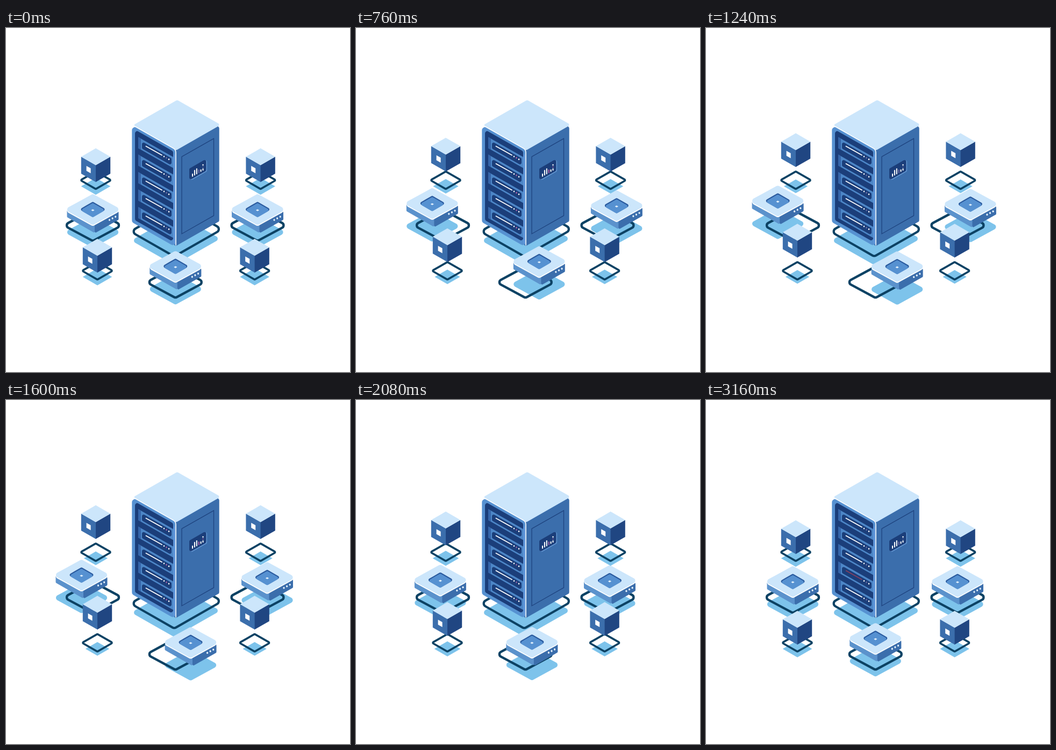
An HTML page with a canvas for the animation above (3600 ms loop, 640 by 640 pixels).

```html
<!DOCTYPE html>
<html lang="en">
<head>
<meta charset="utf-8">
<title>Server network</title>
<style>
  html, body { margin: 0; width: 100%; height: 100%; overflow: hidden; background: #fff; }
  canvas { display: block; width: 640px; height: 640px; }
</style>
</head>
<body>
<canvas id="stage"></canvas>
<script>
const LOOP = 3600, STEP = 20, LAST = 3160;
const SLOPE = 0.57;
const C = {
  pale: '#cce6fb', frame: '#5691d1', light: '#5b92cc', mid: '#3b6eac', deep: '#204682',
  navy: '#1b3e7a', ring: '#0c4264', shadow: '#7dc3eb', white: '#fff', spark: '#e4f2fd'
};
const canvas = document.getElementById('stage');
const g = canvas.getContext('2d');
const dpr = window.devicePixelRatio || 1;
canvas.width = canvas.height = 640 * dpr;

// Closed polygon with rounded corners
function trace(pts, r) {
  const n = pts.length, a = pts[n - 1], b = pts[0];
  g.beginPath();
  g.moveTo((a[0] + b[0]) / 2, (a[1] + b[1]) / 2);
  pts.forEach((p, i) => g.arcTo(...p, ...pts[(i + 1) % n], r));
  g.closePath();
}
function fill(pts, color, r = 0) {
  trace(pts, r);
  g.fillStyle = color;
  g.fill();
}
function outline(pts, color, width, r = 0) {
  trace(pts, r);
  g.strokeStyle = color;
  g.lineWidth = width;
  g.stroke();
}
function line(x1, y1, x2, y2, color, width) {
  g.beginPath();
  g.moveTo(x1, y1);
  g.lineTo(x2, y2);
  g.strokeStyle = color;
  g.lineWidth = width;
  g.lineCap = 'round';
  g.stroke();
}
function dot(x, y, rx, ry, color) {
  g.beginPath();
  g.ellipse(x, y, rx, ry, 0, 0, 7);
  g.fillStyle = color;
  g.fill();
}

// Isometric shapes: centred diamond, floor rectangle from its front corner, upright wall
const diamond = (x, y, w, h = w * 0.575) => [[x, y - h], [x + w, y], [x, y + h], [x - w, y]];
const plate = (x, y, left, right) => [
  [x, y], [x + right, y - right * SLOPE],
  [x + right - left, y - (left + right) * SLOPE], [x - left, y - left * SLOPE]
];
const wall = (x, y, w, h, slope = SLOPE) =>
  [[x, y], [x + w, y + w * slope], [x + w, y + w * slope + h], [x, y + h]];

const span = (t, a, b) => Math.min(1, Math.max(0, (t - a) / (b - a)));
const ease = u => (1 - Math.cos(Math.PI * u)) / 2;
const there = u => 1 - Math.abs(1 - 2 * u);
const slide = t => ease(there(span(t, 0, 2400)));
const lift = t => ease(span(t, 0, 1200)) - ease(span(t, 1820, 2400));

// Rhombus travelled at constant speed
function orbit(t) {
  const u = span(t, 0, 2440);
  return [41 * there(u), -12 * Math.asin(Math.sin(2 * Math.PI * u)) * 2 / Math.PI];
}
const glide = (x, y) => t => [x * slide(t), y * slide(t)];
const devices = [
  { x: 161.5, y: 338.5, move: glide(-28, -16) },
  { x: 468, y: 338.5, move: glide(24, -10) },
  { x: 315.3, y: 444.3, move: orbit }
];

function drawFloor(t) {
  fill(plate(313, 441, 80, 86), C.shadow, 5);
  for (const d of devices) {
    const [dx, dy] = d.move(t);
    fill(diamond(d.x + dx, d.y + dy + 41.5, 53, 29), C.shadow, 5);
  }
  outline(plate(313, 425, 81.5, 89), C.ring, 4.2, 6);
  for (const d of devices) outline(diamond(d.x, d.y + 28.7, 54, 29), C.ring, 4.4, 5);
}

function drawSlot(i, y, pink, alert) {
  fill(wall(246, y, 65, 20.5), '#4d87c8');
  fill(wall(246, y, 5, 20.5), '#3666aa');
  fill(wall(253, y + 8, 55, 13.5), C.navy, 3);
  line(260.5, y + 17, 290, y + 33.5, alert ? '#8c3f5e' : C.white, alert ? 1.5 : 2);
  for (let k = 0; k < 3; k++)
    dot(294 + 4.5 * k, y + 36 + 2.6 * k, 1.2, 1.5, k === 1 ? pink : C.white);
}

function drawScreen(pink) {
  fill(wall(342.5, 262, 31.5, 22.5, -SLOPE), '#6598d3', 3);
  fill(wall(341, 261.5, 31.5, 22, -SLOPE), C.navy, 3);
  for (let i = 0; i < 6; i++) {
    const x = 347 + 3.9 * i, y = 275.8 - 2.25 * i;
    const h = 2.5 + 7.5 * Math.exp(-((i - 1.6) ** 2) / 1.6);
    line(x, y, x, y - h, i === 3 ? pink : C.white, 2);
  }
  dot(366.5, 254.8, 1.3, 1.2, C.white);
  dot(366.5, 258.4, 1.1, 1, pink);
}

function drawServer(t) {
  const glow = t < 2400 ? ease(there(t % 1200 / 1200)) : 0;
  const pink = `rgb(${110 + 90 * glow},${110 - 15 * glow},${165 + 5 * glow})`;

  fill(wall(312, 228, 84.7, 180, -SLOPE), C.mid, 4);
  fill(plate(316.5, 227.5, 81, 83), C.pale, 3);
  fill(wall(234.3, 180, 82, 181.3), C.frame, 6);

  g.beginPath();
  g.moveTo(238, 182);
  g.arcTo(316, 226.5, 316, 405, 9);
  g.lineTo(316, 404);
  g.strokeStyle = C.white;
  g.lineWidth = 1.6;
  g.stroke();
  line(313, 236, 313, 401, '#6c9be0', 1.5);

  fill(wall(240, 189, 71, 168.5), C.navy, 4);
  for (let i = 0; i < 5; i++) drawSlot(i, 203 + 32.5 * i, pink, i === 3 && t >= LAST);

  outline(wall(327, 239.5, 59.5, 143.5, -SLOPE), '#1e437f', 1.3);
  drawScreen(pink);
}

function drawDevice(d, t) {
  const [dx, dy] = d.move(t);
  g.save();
  g.translate(d.x + dx, d.y + dy);
  fill(wall(-48, -1, 52, 14.5), C.light, 2);
  fill(wall(3.5, 27, 44.5, 16.5, -SLOPE), C.mid, 2);
  fill(diamond(0, 1.2, 53, 29), C.white, 5);
  fill(diamond(0, -0.8, 53, 29), C.pale, 5);
  fill(diamond(0, -1, 25), '#2a5a9e', 3);
  fill(diamond(0, 0.4, 23.2), C.frame, 3);
  fill(diamond(0, 0.5, 3.2), C.spark);
  for (let i = 0; i < 3; i++) dot(31 + 5.6 * i, 18.6 - 3 * i, 1.6, 1.9, C.spark);
  g.restore();
}

function drawCube(x, y, t) {
  const up = lift(t);
  g.save();
  g.translate(x, y);
  fill(diamond(0, 55, 27.3 * (1 - 0.19 * up)), C.shadow);
  outline(diamond(0, 43.7, 28.4), C.ring, 3.7, 1.5);
  g.translate(0, -28 * up);
  fill(wall(-27.2, 0, 27.6, 31.5), C.mid);
  fill(wall(0, 15.6, 27.2, 31.5, -SLOPE), C.deep);
  fill(diamond(0, 0, 27.2), C.pale);
  fill(wall(-17.4, 17, 8, 9.2), C.white);
  g.restore();
}

// Runs fn for each corner: side is -1 or 1, row is 0 or 1
function corners(fn) {
  for (const row of [0, 1]) for (const side of [-1, 1]) fn(side, row);
}

function drawLinks(t) {
  const head = span(t, 2440, 2580), tail = span(t, 2760, 3000);
  if (head <= tail) return;
  corners((side, row) => {
    const x = 317.5 + side * (123 - 9.5 * row), y = 309.5 + 136 * row;
    const dx = -side * (32 - 3 * row), dy = row ? -16.5 : 18.3;
    line(x + dx * tail, y + dy * tail, x + dx * head, y + dy * head, '#0f3d66', 1.6);
  });
}

function draw(t) {
  g.setTransform(dpr, 0, 0, dpr, 0, 0);
  g.fillStyle = C.white;
  g.fillRect(0, 0, 640, 640);
  drawFloor(t);
  drawServer(t);
  drawLinks(t);
  for (const d of devices) drawDevice(d, t);
  corners((side, row) =>
    drawCube(320.3 - 4 * row + side * (153.3 - 7 * row), 239.5 + 168.5 * row, t));
}

const start = performance.now();
function tick() {
  const t = (performance.now() - start) % LOOP;
  draw(Math.min(LAST, Math.floor(t / STEP) * STEP));
  requestAnimationFrame(tick);
}
tick();
</script>
</body>
</html>
```
